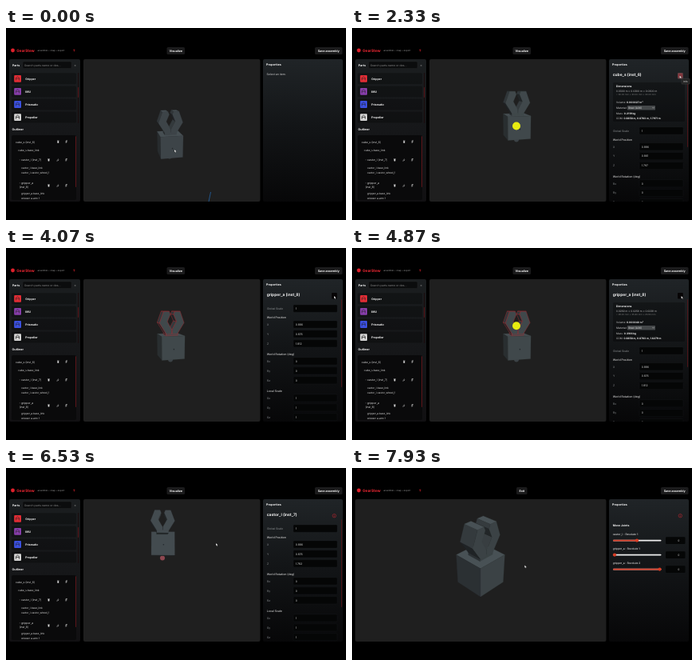
An HTML page for the animation above (8000 ms loop, 426x240 px).

```html
<!DOCTYPE html>
<html lang="en">
<head>
<meta charset="utf-8">
<title>Robot assembly editor</title>
<style>
  html, body { margin: 0; height: 100%; overflow: hidden; background: #000; }
  svg { display: block; width: 100vw; height: 100vh; font-family: Inter, sans-serif; text-rendering: geometricPrecision; }
</style>
</head>
<body>
<svg viewBox="0 0 426 240">
  <defs>
    <linearGradient id="panel" x2="0" y2="1">
      <stop stop-color="#202427"/><stop offset=".5" stop-color="#121416"/><stop offset="1" stop-color="#070708"/>
    </linearGradient>
    <linearGradient id="partsPanel" x2="0" y2="1">
      <stop stop-color="#1b1e20"/><stop offset="1" stop-color="#111012"/>
    </linearGradient>
    <clipPath id="view"><rect x="4" y="39" width="315" height="178"/></clipPath>
    <clipPath id="tree"><rect x="7" y="134" width="81" height="80"/></clipPath>
    <clipPath id="side"><rect x="322" y="39" width="100" height="178"/></clipPath>
  </defs>
  <g id="stage"></g>
</svg>
<script>
const LOOP = 8000, STEP = 8000 / 120;
const stage = document.getElementById('stage');

// Hard changes of the interface, in ms
const PICK_CUBE = 270, INFO_ON = 680, INFO_OFF = 2660, PICK_GRIPPER = 3130,
      INFO_ON_2 = 4330, INFO_OFF_2 = 5060, PICK_CASTOR = 6060, VISUALIZE = 7060;

// time, x, y
const cursorKeys = [
  [0, 211, 152], [250, 211, 150], [600, 411, 60], [750, 411, 60], [1000, 250, 155],
  [1200, 253.5, 134], [1750, 225, 140], [2200, 410, 59], [2330, 410.5, 59.5], [2700, 411, 60],
  [3050, 205, 103], [3400, 203, 101], [3650, 203, 101], [4050, 411, 60], [4870, 412.5, 60],
  [5080, 412, 60], [5300, 260, 130], [5700, 262, 100], [5960, 196, 113], [6150, 196, 113],
  [6530, 263, 94], [6950, 213, 28], [7150, 213, 28], [7450, 240, 130], [7930, 216.3, 121.5]
];
// time, centre x, centre y, cube size, yaw, pitch
const cameraKeys = [
  [0, 205, 145, 27, 12, 18], [850, 205, 145, 27, 12, 18], [1200, 210.5, 116.5, 28.5, 14, 9],
  [1750, 206, 122.5, 28, 15, 11], [5300, 206, 122.5, 28, 15, 11], [5750, 196, 95.5, 27.5, 3, -5],
  [7200, 196, 95.5, 27.5, 3, -5], [7930, 161, 126, 41.5, 45, 35]
];

const parts = {
  cube: { title: 'cube_s (inst_6)', pos: ['0.886', '0.861', '1.797'],
    size: '0.0300 m × 0.0300 m × 0.0300 m', mm: '= 30.00 mm × 30.00 mm × 30.00 mm',
    volume: '0.000027 m³', mass: '0.2119 kg', com: '0.8858 m, 0.8763 m, 1.7971 m' },
  gripper: { title: 'gripper_a (inst_8)', pos: ['0.886', '0.876', '1.812'],
    size: '0.0292 m × 0.0256 m × 0.0239 m', mm: '= 29.20 mm × 25.60 mm × 23.90 mm',
    volume: '0.000040 m³', mass: '0.3166 kg', com: '0.8858 m, 0.8763 m, 1.8279 m' },
  castor: { title: 'castor_l (inst_7)', pos: ['0.886', '0.876', '1.782'] }
};

function at(keys, t) {
  const i = keys.findIndex(k => k[0] > t);
  if (i < 0) return keys[keys.length - 1].slice(1);
  const a = keys[i - 1], b = keys[i];
  let u = (t - a[0]) / (b[0] - a[0]);
  u = u * u * (3 - 2 * u);
  return a.slice(1).map((v, n) => v + (b[n + 1] - v) * u);
}

const rect = (x, y, w, h, fill, r = 1, extra = '') =>
  `<rect x="${x}" y="${y}" width="${w}" height="${h}" rx="${r}" fill="${fill}" ${extra}/>`;
const shade = (x, y, w, h, r = 1.5) => rect(x, y, w, h, '#000', r, 'fill-opacity=".3"');
const circle = (x, y, r, fill, extra = '') =>
  `<circle cx="${x}" cy="${y}" r="${r}" fill="${fill}" ${extra}/>`;
const path = (d, stroke, width = .6, fill = 'none') =>
  `<path d="${d}" stroke="${stroke}" stroke-width="${width}" fill="${fill}"/>`;
const text = (x, y, s, size = 3.5, fill = '#ddd', weight = 400, extra = '') =>
  `<text x="${x}" y="${y}" font-size="${size}" fill="${fill}" font-weight="${weight}" ${extra}>${s}</text>`;
const bold = (x, y, s, size = 4, extra = '') => text(x, y, s, size, '#f2f2f2', 700, extra);

// ---- Model: extruded outlines, one cube side is one unit ----
function prism(outline, depth) {
  const front = outline.map(([x, y]) => [x, y, depth]);
  const back = outline.map(([x, y]) => [x, y, -depth]);
  const sides = outline.map((_, i) => {
    const j = (i + 1) % outline.length;
    return [front[i], back[i], back[j], front[j]];
  });
  return [front, [...back].reverse(), ...sides];
}
const box = (w, y0, y1) => [[-w, y0], [w, y0], [w, y1], [-w, y1]];
const finger = [[-.01, .56], [-.01, .76], [-.2, 1.1], [-.07, 1.4], [-.12, 1.52], [-.36, 1.52], [-.54, 1.04], [-.24, .56]];
const mirrored = finger.map(([x, y]) => [-x, y]).reverse();
const cubeFaces = prism(box(.5, -.5, .5), .5);
const gripperFaces = [prism(box(.26, .5, .62), .24), prism(finger, .25), prism(mirrored, .25)].flat();

function model(t, selected, info) {
  const [cx, cy, size, yaw, pitch] = at(cameraKeys, t);
  const rad = Math.PI / 180;
  const [sy, co, sp, cp] = [Math.sin(yaw * rad), Math.cos(yaw * rad), Math.sin(pitch * rad), Math.cos(pitch * rad)];
  const turn = ([x, y, z]) => {
    const depth = z * co - x * sy;
    return [x * co + z * sy, y * cp - depth * sp, y * sp + depth * cp];
  };
  const project = p => {
    const [x, y, z] = turn(p), k = size / (1 - z * .12);
    return [cx + x * k, cy - y * k, z];
  };
  function draw(faces, stroke) {
    return faces.map(face => {
      const v = face.map(turn), pts = face.map(project);
      let normal = [0, 0, 0], area = 0;
      v.forEach((a, i) => {
        const j = (i + 1) % v.length, b = v[j];
        normal = normal.map((n, k) => n + a[(k + 1) % 3] * b[(k + 2) % 3] - a[(k + 2) % 3] * b[(k + 1) % 3]);
        area += pts[j][0] * pts[i][1] - pts[i][0] * pts[j][1];
      });
      const len = Math.hypot(...normal), [nx, ny, nz] = normal.map(n => n / len);
      return { pts, area, light: .56 + .2 * ny + .2 * nz + .13 * nx, z: pts.reduce((s, p) => s + p[2], 0) / pts.length };
    }).filter(f => f.area > 0).sort((a, b) => a.z - b.z).map(f => {
      const fill = `rgb(${[86, 96, 101].map(c => Math.round(c * f.light))})`;
      return `<polygon points="${f.pts.map(p => p[0].toFixed(2) + ',' + p[1].toFixed(2)).join(' ')}" fill="${fill}" stroke="${stroke || fill}" stroke-width="${stroke ? .45 : .2}"/>`;
    }).join('');
  }
  const wheel = project([0, -.62, 0]), hole = project([.02, -.05, .5]), mass = project([0, selected === 'gripper' ? .9 : 0, 0]);
  let out = t < 450 ? path('M254 217L256.5 205', '#2364a8', .8) : '';
  out += circle(wheel[0], wheel[1], size * .11, selected === 'castor' ? '#8d4750' : '#3b4246');
  out += draw(cubeFaces);
  if (pitch < 25) out += circle(hole[0], hole[1], .8, '#25292c');
  out += draw(gripperFaces, selected === 'gripper' ? '#a32d34' : '');
  if (info) out += circle(mass[0], mass[1], 5, '#e8ec10');
  return `<g clip-path="url(#view)">${out}</g>`;
}

// ---- Interface ----
function header(exit) {
  return circle(8.5, 28, 2.4, '#e0202b') + text(13.3, 30, 'GearStew', 4.7, '#ee2733', 700)
    + text(39.5, 29.3, 'assemble • snap • export', 2.8, '#999')
    + text(84, 29.5, '?', 4.6, '#d3222c', 700)
    + (exit ? rect(206, 24, 13.5, 9, '#1b1b1c', 1.5) : rect(201.5, 24, 22.5, 9, '#1b1b1c', 1.5))
    + bold(212.8, 29.8, exit ? 'Exit' : 'Visualize', 3.7, 'text-anchor="middle"')
    + rect(387, 24, 34.5, 9, '#1b1b1c', 1.5) + bold(404.2, 29.8, 'Save assembly', 3.7, 'text-anchor="middle"');
}

const trash = (x, y) => rect(x - .9, y - 1, 1.8, 2.5, '#ddd', .4) + path(`M${x - 1.3} ${y - 1.4}h2.6`, '#ddd', .5);
const link = (x, y) => path(`M${x - 1.4} ${y + 1.2}l2.6 -2.6M${x - .2} ${y + 1.4}l1.6 -1.6`, '#ccc', .6);
const pin = (x, y) => path(`M${x - .8} ${y + 1.6}v-3h1.8M${x - .8} ${y}h1.4`, '#ccc', .7);

function partsPanel() {
  let out = rect(4, 39, 89, 178, 'url(#partsPanel)', 2) + bold(8, 48, 'Parts', 3.6)
    + rect(21, 42, 61, 8.5, '#0b0c0d', 1.5, 'stroke="#292c2e" stroke-width=".3"')
    + text(23, 47.5, 'Search parts name or des...', 3.5, '#858585') + text(85.3, 47.8, '×', 4, '#999');
  [['Gripper', '#e22d35'], ['IMU', '#873eaa'], ['Prismatic', '#3b50df'], ['Propeller', '#d5d5d5']].forEach(([name, color], i) => {
    const y = 63.3 + i * 16.1;
    out += shade(7, y - 7, 81, 14) + rect(10.2, y - 4.4, 8.8, 8.8, color, 1)
      + path(`M12.5 ${y + 2}v-3l2 -1.5l2 1.5v3M12.5 ${y}h4`, i === 3 ? '#333' : '#222a', .8)
      + bold(24.2, y + 1.5, name, 3.5);
  });
  out += rect(90.2, 56, .9, 63, '#1d0a0b', .4) + rect(90.2, 74, .9, 13, '#65161b', .4)
    + bold(7.5, 128.2, 'Outliner', 3.7) + rect(7, 134, 81, 81, '#0a0a0b', 2);
  const rows = text(12, 143.7, 'cube_s (inst_6)', 3.4)
    + trash(65.3, 142.3) + pin(76, 142.3) + text(15, 153.6, 'cube_s.base_link', 3.3)
    + text(16.5, 166, '- castor_l (inst_7)', 3.4)
    + trash(53.5, 165) + link(64.8, 165) + pin(75.8, 165)
    + text(19, 176, 'castor_l.base_link', 3.2) + text(19, 181.5, 'castor_l.castor_wheel_1', 3.2)
    + text(16.5, 195.4, '- gripper_a', 3.4) + text(16.5, 200.4, '(inst_8)', 3.4)
    + trash(53.5, 197) + link(64.8, 197) + pin(75.8, 197)
    + text(19, 208.2, 'gripper_a.base_link', 3.2) + text(19, 213.7, 'gripper_a.arm_1', 3.2);
  return out + `<g clip-path="url(#tree)">${rows}</g>` + rect(87, 135, .9, 64, '#65161b', .4);
}

const infoIcon = () => circle(411.3, 59.7, 2.2, 'none', 'stroke="#c22831" stroke-width=".55"')
  + path('M411.3 59.2v1.8M411.3 58.2v.4', '#c22831', .6);
const infoButton = state => state === 'pressed' ? rect(408, 56, 6.8, 7.5, '#070506', 1)
  : (state === 'hover' ? rect(408, 56, 6.8, 7.5, '#693f44', 1) : '') + infoIcon();

function field(y, label, value) {
  return text(327, y + 1.2, label, 3.4, '#909496')
    + rect(360, y - 4.6, 55, 9.2, '#050606', 1.3, 'stroke="#1d2022" stroke-width=".3"')
    + text(362.7, y + 1.2, value, 3.4);
}

function details(part) {
  const pair = (y, label, value) => text(331, y, `${label}: <tspan font-weight="700" fill="#eee">${value}</tspan>`, 3.2, '#ccc');
  return shade(327, 68, 90, 49) + bold(331, 74.2, 'Dimensions', 3.4)
    + text(331, 80.2, part.size, 3.2, '#bbb') + text(331, 84.4, part.mm, 2.8, '#777')
    + pair(94.2, 'Volume', part.volume) + text(331, 101, 'Material:', 3.3, '#ccc')
    + rect(345, 97, 35, 5.6, '#45484a', .7) + text(346.2, 101, 'Steel (A36)', 3.2, '#eee')
    + path('M376.5 99.2l1 1l1 -1', '#eee', .5)
    + pair(107.7, 'Mass', part.mass) + pair(114, 'COM', part.com);
}

function properties(part, info, button) {
  if (!part) return text(326.5, 58.8, 'Select an item.', 3.5, '#ccc');
  const y = info ? 128.5 : 75.7;
  let out = bold(326.7, 60.2, part.title, 4.9) + infoButton(button) + (info ? details(part) : '')
    + field(y, 'Global Scale', 1);
  [['World Position', 'XYZ', part.pos], ['World Rotation (deg)', ['Rx', 'Ry', 'Rz'], [0, 0, 0]], ['Local Scale', ['Sx', 'Sy', 'Sz'], [1, 1, 1]]]
    .forEach(([title, names, values], g) => {
      const top = y + 11.5 + g * 46;
      out += text(326.7, top + .6, title, 3.5, '#ccc', 500);
      for (let i = 0; i < 3; i++) out += field(top + 8.3 + i * 11.9, names[i], values[i]);
    });
  return out + rect(420, 64, .8, info ? 85 : 110, '#5c1519', .4);
}

function joints() {
  let out = infoButton() + bold(326.7, 73, 'Move Joints', 3.5);
  [['castor_l - Revolute 1', 357], ['gripper_a - Revolute 1', 329], ['gripper_a - Revolute 2', 385.5]].forEach(([name, x], i) => {
    const y = 90.6 + i * 18;
    out += text(326.7, y - 6.8, name, 3.3, '#ddd', 500) + rect(327, y - .9, 60.5, 1.8, '#eee', .9)
      + rect(327, y - .9, x - 327, 1.8, '#d33a25', .9) + circle(x, y, 2.1, '#d83c25')
      + rect(393, y - 4.4, 24.5, 8.8, '#050606', 1.3) + text(408.3, y + 1.2, 0, 3.4);
  });
  return out;
}

function scene(t) {
  const visualize = t >= VISUALIZE;
  const selected = visualize || t < PICK_CUBE ? '' : t < PICK_GRIPPER ? 'cube' : t < PICK_CASTOR ? 'gripper' : 'castor';
  const info = (t >= INFO_ON && t < INFO_OFF) || (t >= INFO_ON_2 && t < INFO_OFF_2);
  const [x, y] = at(cursorKeys, t);
  const over = Math.abs(x - 411) < 4 && Math.abs(y - 60) < 4;
  const tooltip = (t > 2270 && t < INFO_OFF) || (t > 4130 && t < INFO_ON_2);
  const button = !over ? '' : tooltip ? 'hover' : 'pressed';
  return header(visualize) + (visualize ? '' : partsPanel())
    + rect(visualize ? 4 : 97, 39, visualize ? 314.5 : 221.5, 178, '#1f1f1f', 2) + model(t, selected, info)
    + rect(322, 39, 100, 178, 'url(#panel)', 2) + bold(326, 46.8, 'Properties', 3.7)
    + `<g clip-path="url(#side)">${visualize ? joints() : properties(parts[selected], info, button)}</g>`
    + (tooltip ? rect(413, 63.3, 10.2, 6.8, '#242424', .5, 'stroke="#555" stroke-width=".3"') + text(415, 67.9, 'Info', 3.2) : '')
    + `<path transform="translate(${x} ${y})" d="M0 0V3.2L.8 2.5L1.5 3.8L2.1 3.5L1.5 2.3H2.5Z" fill="#fff" stroke="#111" stroke-width=".2"/>`;
}

let last = -1;
function frame() {
  const step = Math.floor((performance.now() % LOOP) / STEP + .1);
  if (step !== last) stage.innerHTML = scene((last = step) * STEP);
  requestAnimationFrame(frame);
}
frame();
</script>
</body>
</html>
```
